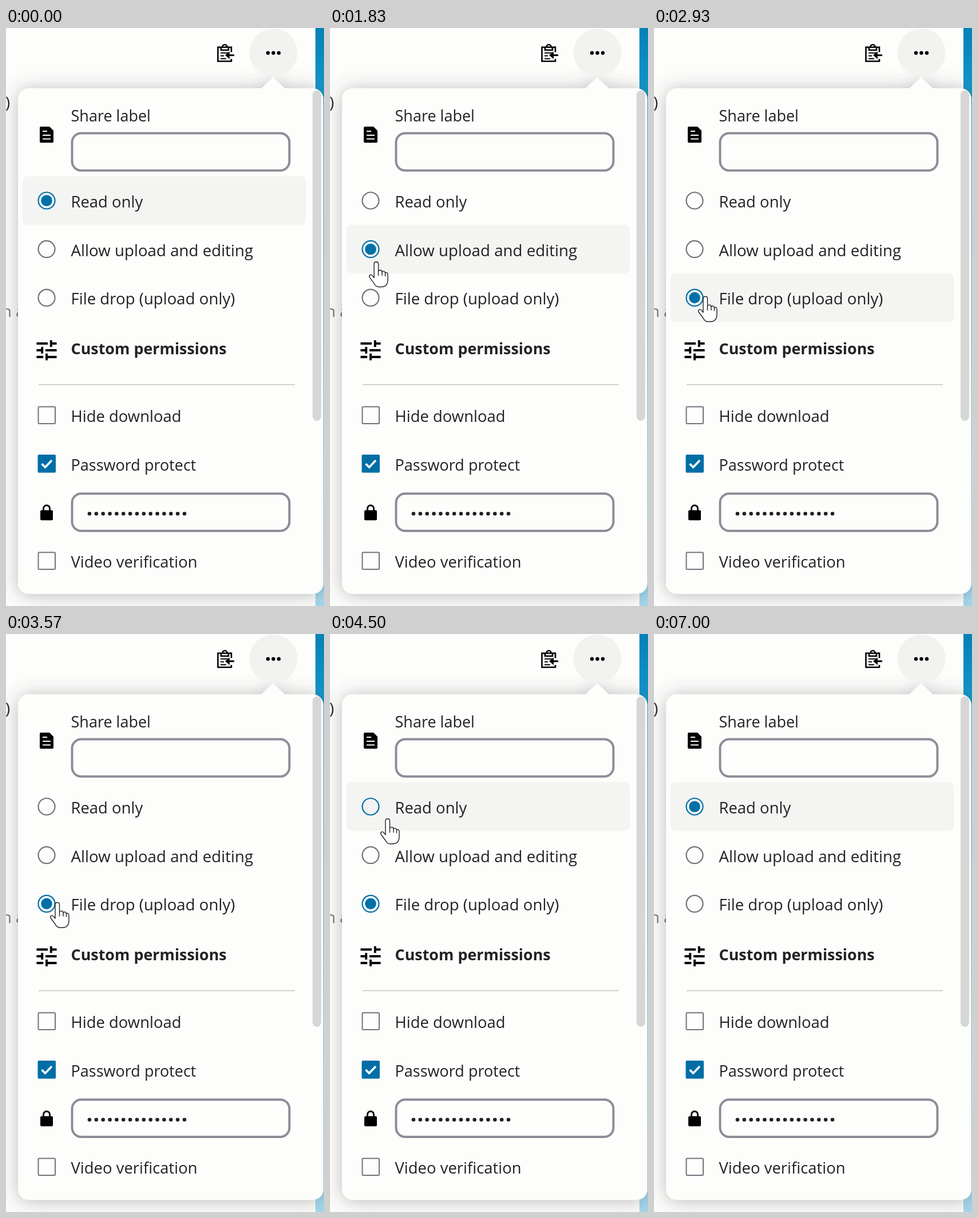
These frames come from a looping animation (556 px wide and 1008 px high, 7030 ms). An HTML page:

```html
<!DOCTYPE html>
<html lang="en">
<head>
<meta charset="utf-8">
<title>Share options</title>
<style>
  html, body { margin: 0; width: 100%; height: 100%; overflow: hidden; background: #fdfdfb; }
  svg { display: block; }
  text { font: 27.45px "Open Sans", "Noto Sans", sans-serif; fill: #222; }
  .input { fill: #fdfdfb; stroke: #8d8d99; stroke-width: 4; }
  .box { fill: #fdfdfb; stroke: #73737c; stroke-width: 2; }
  .ring { fill: none; stroke-width: 2.2; }
</style>
</head>
<body>
<svg width="556" height="1008" viewBox="0 0 556 1008">
  <defs>
    <linearGradient id="sky" x1="0" y1="0" x2="0" y2="1">
      <stop offset="0" stop-color="#0481b7"/>
      <stop offset=".1" stop-color="#1294c8"/>
      <stop offset="1" stop-color="#a4d8ec"/>
    </linearGradient>
    <filter id="shadow" x="-20%" y="-20%" width="140%" height="140%">
      <feDropShadow dx="0" dy="2" stdDeviation="16" flood-color="#4d4d50" flood-opacity=".38"/>
    </filter>
  </defs>

  <!-- page behind the menu -->
  <rect width="556" height="1008" fill="#fdfdfb"/>
  <rect x="541" width="15" height="1008" fill="url(#sky)"/>
  <text x="-1" y="140">)</text>
  <text x="-7" y="504" style="fill:#777">n a</text>

  <!-- menu panel -->
  <path filter="url(#shadow)" fill="#fdfdfb" d="M40 105H447L467 86L487 105H536a19 19 0 0 1 19 19V968a19 19 0 0 1-19 19H40a19 19 0 0 1-19-19V124a19 19 0 0 1 19-19Z"/>
  <rect x="536" y="109" width="15" height="576" rx="7.5" fill="#d6d6d6"/>

  <!-- toolbar -->
  <circle cx="467.5" cy="43" r="42" fill="#f2f2f1"/>
  <path d="M458 43.5H478" stroke="#000" stroke-width="6.4" stroke-linecap="round" stroke-dasharray="0 9.5"/>
  <g fill="none" stroke="#000" stroke-width="2.6">
    <path d="M394 42V33.5H370.5V58H394V54"/>
    <path d="M376 34V38.5H389V34M378.5 33a4 4 0 0 1 8 0"/>
    <path d="M375 43.5H389M375 48.5H381M375 53.5H385" stroke-width="2"/>
    <path d="M399 47.5H387" stroke-width="3"/>
  </g>
  <path d="M383 47.5L391 41V54Z"/>

  <!-- label field -->
  <path d="M61 172H76L83 179V198a2 2 0 0 1-2 2H61a2 2 0 0 1-2-2V174a2 2 0 0 1 2-2Z"/>
  <path d="M64 180H72M64 187H78M64 193.5H78" stroke="#fdfdfb" stroke-width="2.2"/>
  <text x="113.500" y="163" style="font-size:27px">Share label</text>
  <rect class="input" x="115.5" y="183.5" width="380" height="65" rx="16"/>

  <g id="options"></g>

  <path transform="translate(47.6 538.6) scale(1.95)" d="M3 17V19H9V17ZM3 5V7H13V5ZM13 21V19H21V17H13V15H11V21ZM7 9V11H3V13H7V15H9V9ZM21 13V11H11V13ZM15 9H17V7H21V5H17V3H15Z"/>
  <text x="113.5" y="569" style="font-size:26.9px;font-weight:700">Custom permissions</text>
  <path d="M57 622H505" stroke="#d2d2d0" stroke-width="2"/>

  <rect class="box" x="56.5" y="660.5" width="29.5" height="29.5" rx="1.5"/>
  <text x="113.5" y="687">Hide download</text>

  <rect x="55.5" y="744" width="31.5" height="31.5" rx="2" fill="#006ea6"/>
  <path d="M62.5 760L68.5 766L80 754" fill="none" stroke="#fff" stroke-width="3.6"/>
  <text x="113.5" y="772" style="font-size:27px">Password protect</text>

  <path d="M65.5 843V838a5.5 5.5 0 0 1 11 0V843" fill="none" stroke="#000" stroke-width="3"/>
  <rect x="60" y="841" width="22" height="17.5" rx="2"/>
  <rect class="input" x="115.5" y="812" width="380" height="65" rx="16"/>
  <path d="M146 847H313" stroke="#222" stroke-width="6.6" stroke-linecap="round" stroke-dasharray="0 11.86"/>

  <rect class="box" x="56.5" y="914.5" width="29.5" height="29.5" rx="1.5"/>
  <text x="113.5" y="941">Video verification</text>

  <g id="hand" stroke="#222" stroke-width="1.4" stroke-linejoin="round" stroke-linecap="round">
    <path fill="#fff" d="M-4 4C-4-1 3.5-1 3.5 4V17C5 14 9.5 14 10 18C12 15.5 15.5 17 15.5 20C17.5 18 20 19 20 23V31C20 38 17 44 9 44H4C0 44-2 42-4 38L-12 27C-13.5 23-9 21.5-7 24.5L-4 28Z"/>
    <path fill="none" d="M3.5 17V24M10 18V24M15.5 20V25"/>
  </g>
</svg>
<script>
const LOOP = 7030, BLUE = "#0070a8", GREY = "#73737c", TOP = 258.5, STEP = 84.7;
const byId = id => document.getElementById(id);
const labels = [["Read only", 27.45], ["Allow upload and editing", 27.7], ["File drop (upload only)", 27.6]];

byId("options").innerHTML = labels.map(([label, size], i) => `
  <g transform="translate(0 ${TOP + i * STEP})">
    <rect class="hover" x="29" width="495.5" height="${STEP}" rx="9" fill="#f4f4f2"/>
    <circle class="ring" cx="71" cy="42.5" r="14.5"/>
    <circle class="dot" cx="71" cy="42.5" r="9.8" fill="${BLUE}"/>
    <text x="113.5" y="54.5" style="font-size:${size}px">${label}</text>
  </g>`).join("");
const rows = [...byId("options").children].map(g =>
  ["hover", "ring", "dot"].map(name => g.querySelector("." + name)));

// time, x, y of the pointer tip
const path = [
  [520, -24, 300], [1050, 81, 407], [1800, 81, 407], [2330, 88.5, 451.5],
  [2800, 90, 468], [3700, 90, 468], [4400, 101, 322], [4800, 101, 322],
  [5250, 24.5, 286], [5400, 22, 286]
];
// time, selected row
const clicks = [[0, 0], [1500, 1], [2800, 2], [4700, 0]];

function pointer(t) {
  const k = path.findIndex(p => p[0] > t);
  if (k < 1) return null;
  const [t0, x0, y0] = path[k - 1], [t1, x1, y1] = path[k];
  const u = (t - t0) / (t1 - t0), e = u * u * (3 - 2 * u);
  return [x0 + (x1 - x0) * e, y0 + (y1 - y0) * e];
}

function hovered(t, p) {
  if (t > 4700 || !p || p[0] < 29) return 0;
  if (t > 2950 && t < 3720) return -1;
  return Math.floor((p[1] - TOP) / STEP);
}

function draw(t) {
  const p = pointer(t), over = hovered(t, p);
  const chosen = clicks.filter(c => c[0] <= t).pop()[1];
  rows.forEach(([hover, ring, dot], i) => {
    hover.style.opacity = +(i === over);
    dot.style.opacity = +(i === chosen);
    ring.style.stroke = i === over || i === chosen ? BLUE : GREY;
  });
  byId("hand").style.opacity = p ? 1 : 0;
  if (p) byId("hand").setAttribute("transform", `translate(${p})`);
}

const start = performance.now();
function frame() {
  draw((performance.now() - start) % LOOP);
  requestAnimationFrame(frame);
}
frame();
</script>
</body>
</html>
```
